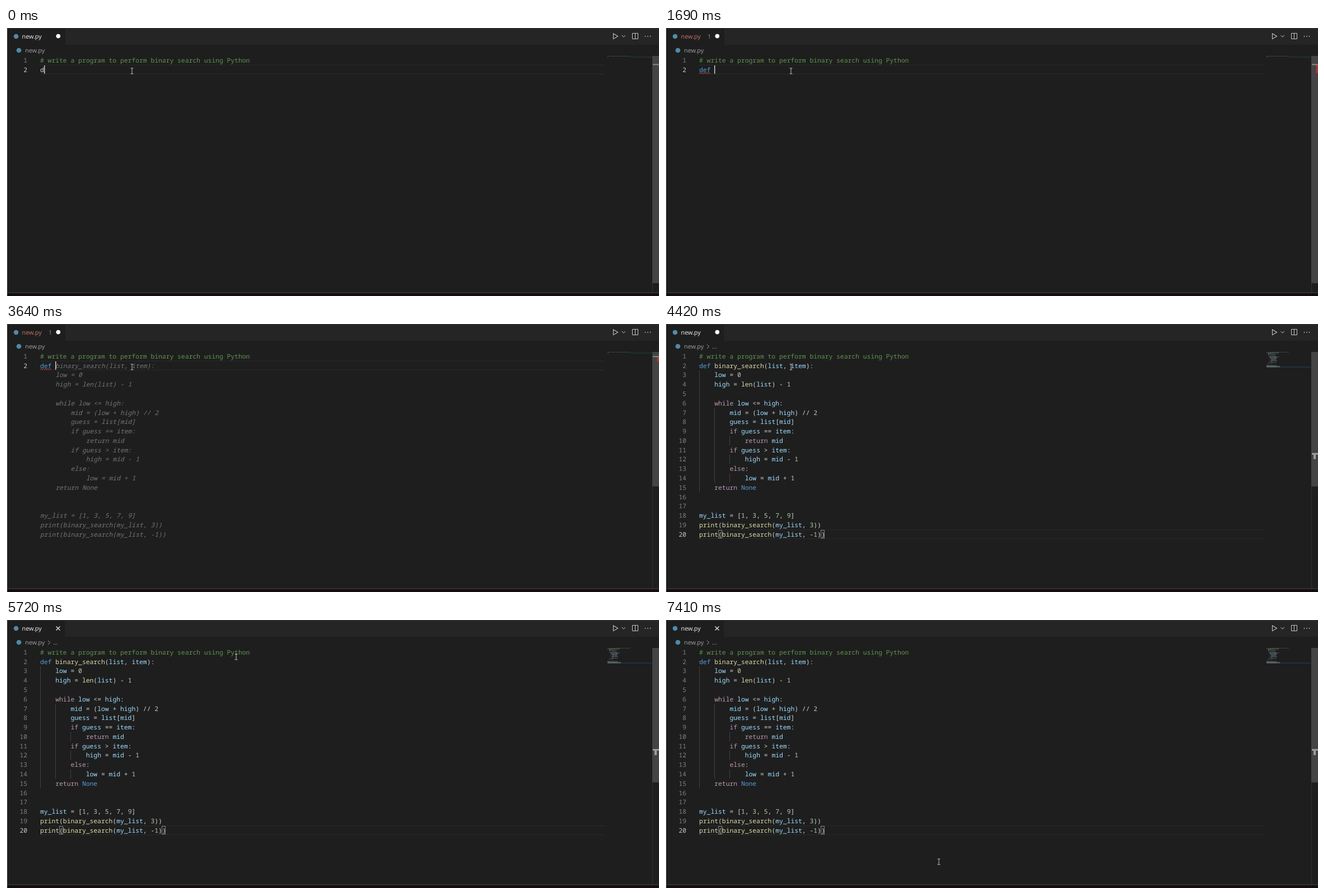
Write an HTML page with a canvas that moves like this. It is 1166 by 480 pixels and loops after 7.54 s.

```html
<!DOCTYPE html>
<html lang="en">
<head>
<meta charset="utf-8">
<title>Editor</title>
<style>
html, body { margin: 0; width: 100%; height: 100%; overflow: hidden; background: #1e1e1e; }
canvas { display: block; }
</style>
</head>
<body>
<canvas id="stage" width="1166" height="480"></canvas>
<script>
const ctx = document.getElementById('stage').getContext('2d');
ctx.textRendering = 'geometricPrecision';

const LOOP = 7540, STEP = 130;
const ERROR_AT = 780, GHOST_AT = 2600, ACCEPT_AT = 3900, SAVE_AT = 4940;
const LEFT = 61, TOP = 49.4, CHAR = 6.81, LINE = 16.79;
const MONO = '500 11.35px "Noto Sans Mono", monospace';
const UI = '10.8px "Open Sans", sans-serif';

const CODE = `# write a program to perform binary search using Python
def binary_search(list, item):
    low = 0
    high = len(list) - 1

    while low <= high:
        mid = (low + high) // 2
        guess = list[mid]
        if guess == item:
            return mid
        if guess > item:
            high = mid - 1
        else:
            low = mid + 1
    return None


my_list = [1, 3, 5, 7, 9]
print(binary_search(my_list, 3))
print(binary_search(my_list, -1))`.split('\n');

// time, x, y
const MOUSE = [
  [0, 225, 77], [4810, 225, 77], [5460, 411, 66], [5850, 411, 66],
  [6370, 1102, 16], [6890, 1102, 16], [7280, 489, 433], [LOOP, 489, 433]
];

function rect(x, y, w, h, color) {
  ctx.fillStyle = color;
  ctx.fillRect(x, y, w, h);
}

function text(s, x, y, color, font = MONO, align = 'left') {
  ctx.font = font;
  ctx.textAlign = align;
  ctx.fillStyle = color;
  ctx.fillText(s, x, y);
}

function disc(x, y, r, color) {
  ctx.fillStyle = color;
  ctx.beginPath();
  ctx.arc(x, y, r, 0, 7);
  ctx.fill();
}

function stroke(path, color, width = 1) {
  ctx.strokeStyle = color;
  ctx.lineWidth = width;
  ctx.stroke(new Path2D(path));
}

const colX = c => LEFT + c * CHAR;
const rowY = r => TOP + r * LINE;
const baseY = r => rowY(r) + 12.4;

function tokenColor(s) {
  if (s[0] === '#') return '#5f9350';
  if (/^(def|None)$/.test(s)) return '#569cd6';
  if (/^(while|if|else|return)$/.test(s)) return '#b898b4';
  if (/^(binary_search|len|print)$/.test(s)) return '#dcdcaa';
  if (/^\d/.test(s)) return '#b5cea8';
  return /^[a-z]{2}/.test(s) ? '#9cdcfe' : '#d4d4d4';
}

const tokens = line => [...line.matchAll(/#.*|\w+|[^\w\s]+/g)];

function mouseAt(t) {
  const i = MOUSE.findIndex(k => k[0] > t);
  const [t0, x0, y0] = MOUSE[i - 1], [t1, x1, y1] = MOUSE[i];
  const u = (t - t0) / (t1 - t0), e = u * u * (3 - 2 * u);
  return { x: x0 + (x1 - x0) * e, y: y0 + (y1 - y0) * e };
}

function drawHeader(s) {
  rect(0, 0, 1166, 480, '#1e1e1e');
  rect(2, 0, 1164, 30, '#252526');
  rect(2, 0, s.accepted ? 103 : 104, 30, '#1e1e1e');
  rect(2, 0, 1164, 1, '#363636');

  const title = s.error ? '#c4756c' : '#f4f4f4';
  disc(18, 15, 4.3, '#4f8aa8');
  text('new.py', 28.5, 19, title, UI);
  if (s.error) text('1', 76, 19, title, UI);
  if (s.saved) stroke('M89.5 11.5l7 7m0-7l-7 7', '#e8e8e8', 1.3);
  else disc(93.3, 14.6, 3.8, '#fff');

  disc(23, 40, 4.3, '#4f8aa8');
  text('new.py', 34, 44, '#a2a2a2', UI);
  if (s.accepted) {
    stroke('M75 37l3.7 3.5l-3.7 3.5', '#a2a2a2');
    text('...', 84, 44, '#a2a2a2', UI);
  }

  const icon = '#c5c5c5';
  if (s.onMenu) rect(1096, 6, 12, 18, '#343536');
  stroke('M1084.5 10v9.6l8-4.8z', icon, 1.1);
  stroke('M1099.5 13l3.2 3.2l3.2-3.2', icon);
  stroke('M1118.5 9.5h10v10h-10zM1123.5 9.5v10', icon);
  for (const x of [1141.5, 1146, 1150.5]) disc(x, 14.8, 0.9, icon);
}

function drawCode(s) {
  const top = Math.round(rowY(s.row)) + 0.5;
  stroke(`M${LEFT} ${top}H1069M${LEFT} ${top + 16}H1069`, '#2a2a2a');

  if (s.accepted) {
    const guide = (col, from, to) =>
      stroke(`M${Math.floor(colX(col)) + 0.5} ${rowY(from)}V${rowY(to)}`, '#404040');
    guide(0, 2, 15);
    guide(4, 6, 14);
    for (const r of [9, 11, 13]) guide(8, r, r + 1);
    for (const c of [5, 32]) {
      ctx.strokeStyle = '#858585';
      ctx.lineWidth = 1;
      ctx.strokeRect(Math.floor(colX(c)) + 0.5, top + 1, 6, 14);
    }
  }

  s.lines.forEach((line, r) => {
    text(r + 1, 38, baseY(r), r === s.row ? '#c6c6c6' : '#808080', MONO, 'right');
    for (const m of tokens(line)) text(m[0], colX(m.index), baseY(r), tokenColor(m[0]));
  });

  if (s.ghost) {
    CODE.slice(1).forEach((line, i) => {
      const from = i ? line.search(/\S|$/) : 4;
      text(line.slice(from), colX(from), baseY(i + 1), '#747474', 'italic ' + MONO);
    });
  }
  if (s.error) stroke('M61 82' + 'l2-2.2l2 2.2'.repeat(5), '#b5483f');
  if (s.caret) rect(Math.round(colX(s.lines[s.row].length)), top + 0.5, 1.4, 15, '#d8d8d8');
}

function drawMinimap(s) {
  const y = r => 50 + r * 1.39;
  rect(s.accepted ? 1074 : 1114, y(s.row), s.accepted ? 79 : 39, 1.3, s.accepted ? '#243c50' : '#203a40');
  ctx.globalAlpha = 0.55;
  s.lines.forEach((line, r) => {
    for (const m of tokens(line)) {
      [...m[0]].forEach((c, i) => {
        if (c !== ' ') rect(1074 + (m.index + i) * 0.73, y(r), 0.65, 1, tokenColor(m[0]));
      });
    }
  });
  ctx.globalAlpha = 1;
}

function drawScrollbar(s) {
  const long = s.ghost || s.accepted;
  rect(1154, 50, 1, 424, '#303030');
  rect(1154, 50, 12, long ? 241 : 407, s.inEditor ? '#444' : '#232323');
  if (s.accepted) {
    rect(1155, 231, 11, 3, '#9c9c9c');
    rect(1158, 234, 4, 8, '#9c9c9c');
  } else {
    const y = long ? 58 : 65;
    if (s.error) rect(1162.5, y + 1, 3.5, long ? 9 : 15, '#a03a35');
    rect(1155, y - 0.5, 11, 1.8, '#8e8e8e');
  }
}

function drawMouse({ x, y }, hand) {
  ctx.save();
  ctx.translate(x, y);
  if (hand) {
    const p = new Path2D('M-2-6q1.2-1.2 2 0v4.5l4 1q1 .3 .8 1.5l-.8 4.2v2.6h-5.6v-2l-3.2-4.5q-.2-1.6 1.4-.9l1.4 1.4z');
    ctx.fillStyle = '#fff';
    ctx.fill(p);
    ctx.strokeStyle = '#222';
    ctx.lineWidth = 0.6;
    ctx.stroke(p);
  } else {
    stroke('M-2.5-5H2.5M0-5V5M-2.5 5H2.5', '#bdbdbd');
  }
  ctx.restore();
}

function draw(t) {
  const accepted = t >= ACCEPT_AT;
  const mouse = mouseAt(t);
  const typed = 'def '.slice(0, 1 + t / STEP);
  const lines = accepted ? CODE : [CODE[0], typed];
  const lastKey = accepted ? ACCEPT_AT : 3 * STEP;
  const s = {
    accepted, lines,
    row: lines.length - 1,
    error: t >= ERROR_AT && !accepted,
    ghost: t >= GHOST_AT && !accepted,
    saved: t >= SAVE_AT,
    caret: t < lastKey || (t - lastKey) % 1000 < 500,
    inEditor: mouse.y > 48,
    onMenu: mouse.x > 1096 && mouse.y < 26
  };
  drawHeader(s);
  drawCode(s);
  drawMinimap(s);
  drawScrollbar(s);
  rect(2, 473.5, 1164, 1.5, '#363636');
  rect(2, 475, 1164, 5, '#150d12');
  rect(0, 0, 2, 480, '#fff');
  drawMouse(mouse, s.onMenu);
}

const start = performance.now();
function tick() {
  const t = (performance.now() - start) % LOOP;
  draw(Math.floor(t / STEP) * STEP);
  requestAnimationFrame(tick);
}
tick();
</script>
</body>
</html>
```
